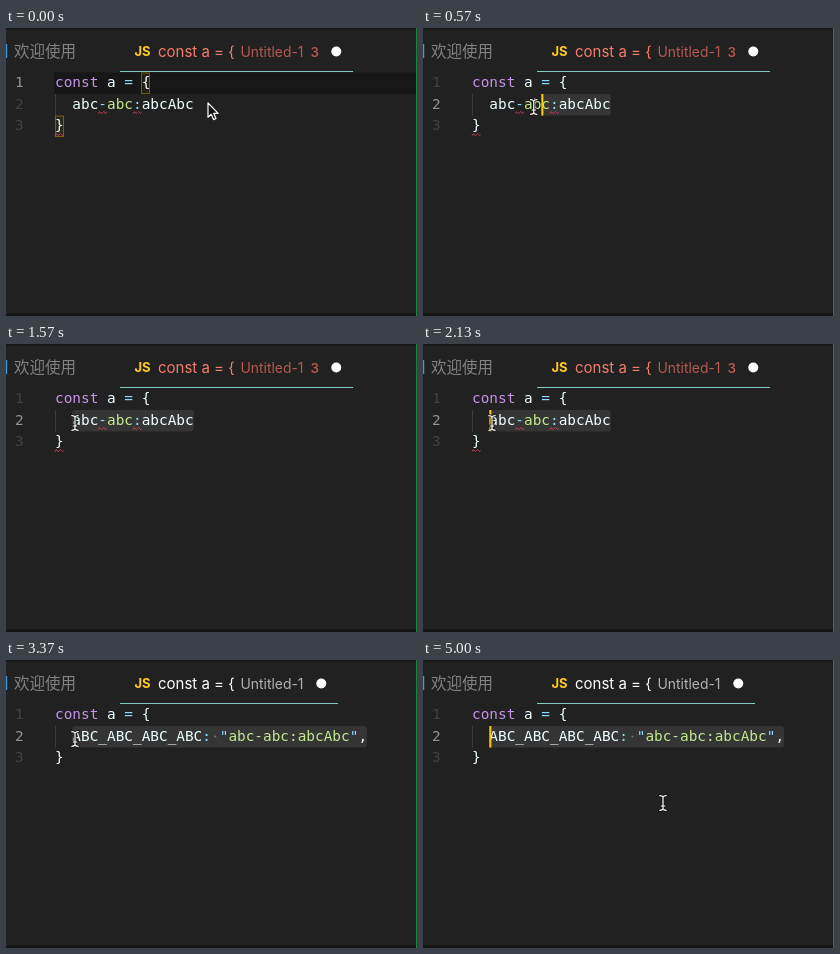
An HTML page for the animation above (5210 ms loop, 411 by 288 pixels).

```html
<!DOCTYPE html>
<html lang="zh">
<head>
<meta charset="utf-8">
<title>Editor: convert to constant</title>
<style>
html, body { margin: 0; width: 100%; height: 100%; overflow: hidden; background: #212121; }
svg { display: block; width: 411px; height: 288px; }
text { white-space: pre; }
.code { font: 14.4px "DejaVu Sans Mono", "Liberation Mono", monospace; font-variant-ligatures: none; }
.ui { font-family: Inter, "Liberation Sans", sans-serif; }
.cjk { font: 15.5px "Noto Sans CJK SC", "Noto Sans CJK", sans-serif; }
</style>
</head>
<body>
<svg viewBox="0 0 411 288" xmlns="http://www.w3.org/2000/svg">
  <rect width="411" height="288" fill="#212121"/>
  <rect width="411" height="1.5" fill="#171717"/>
  <rect y="285.5" width="411" height="2.5" fill="#151515"/>
  <rect x="410" width="1" height="288" fill="#16833f"/>
  <rect y="16" width="1.2" height="14" fill="#3b9be0"/>
  <text class="cjk" x="8" y="29" fill="#828282">欢迎使用</text>
  <text class="ui" x="128.5" y="28.3" font-size="13" font-weight="700" fill="#ffca28">JS</text>
  <text class="ui" id="title" x="152" y="28.7" font-size="15">const a = {</text>
  <text class="ui" id="file" x="234.5" y="28.7" font-size="13.9">Untitled-1</text>
  <text class="ui" id="badge" x="304.5" y="28.5" font-size="13.5" font-weight="500" fill="#c4594f">3</text>
  <circle id="dot" cy="23.5" r="5" fill="#fff"/>
  <rect id="line" x="114" y="43" height="1" fill="#80cbc4"/>

  <rect id="row" x="48" width="362" height="21.6" fill="#171717"/>
  <rect id="sel" y="66" height="21.5" rx="3" fill="#353535"/>
  <rect x="49" y="66" width="1" height="21.6" fill="#3c3c3c"/>
  <g id="match" fill="#ffcc00" fill-opacity=".05" stroke="#ffcc00" stroke-opacity=".36">
    <rect x="135.5" y="45" width="8" height="20.5"/>
    <rect x="49.5" y="88" width="8" height="20.5"/>
  </g>
  <g id="text" class="code"></g>
  <g id="waves" fill="none" stroke="#c9475b" stroke-width="1"></g>
  <rect id="caret" y="66" width="2" height="21.6" fill="#ffcc00"/>
  <g id="beam" fill="none" stroke-linecap="round"></g>
  <path id="arrow" d="M0 0V14.2L3.2 11.2L5.6 16.6L8 15.5L5.7 10.3H10.2Z" fill="#111" stroke="#fff" stroke-width="1.2" stroke-linejoin="round"/>
</svg>
<script>
const NS = 'http://www.w3.org/2000/svg';
const LOOP = 5210, LEFT = 49, CHAR = 8.669, INDENT = LEFT + 2 * CHAR;
const WHITE = '#eeffff', CYAN = '#89ddff', GREEN = '#c3e88d', PURPLE = '#c792ea';
const CLICK = 280, DRAG = 340, DROP = 1130, EDIT = 2670, VALID = 3040, TAB = 3100;
const $ = id => document.getElementById(id);

function add(parent, tag, attrs, content) {
  const el = document.createElementNS(NS, tag);
  set(el, attrs);
  if (content) el.textContent = content;
  parent.appendChild(el);
  return el;
}
function set(el, attrs) {
  for (const k in attrs) el.setAttribute(k, attrs[k]);
}
const show = (el, on) => el.setAttribute('visibility', on ? 'visible' : 'hidden');

// tokens: [text, colour] pairs set on the character grid
function codeLine(x, y, tokens) {
  const g = add($('text'), 'g', {});
  g.runs = tokens.map(([str, fill]) => {
    const run = add(g, 'text', { x, y, fill }, str);
    x += str.length * CHAR;
    return run;
  });
  return g;
}

const numbers = [59, 81, 102].map((y, i) => add($('text'), 'text', { x: 9, y }, String(i + 1)));
codeLine(LEFT, 59, [['const', PURPLE], [' a ', WHITE], ['=', CYAN], [' {', WHITE]]);
codeLine(LEFT, 102, [['}', WHITE]]);
const before = codeLine(INDENT, 81, [
  ['abc', WHITE], ['-', CYAN], ['abc', GREEN], [':', CYAN], ['abcAbc', WHITE]]);
const after = codeLine(INDENT, 81, [
  ['ABC_ABC_ABC_ABC', GREEN], [':', CYAN], [' ', WHITE], ['"', CYAN],
  ['abc-abc:abcAbc', GREEN], ['"', CYAN], [',', WHITE]]);
add(after, 'circle', { cx: INDENT + 16.5 * CHAR, cy: 76.5, r: 1, fill: '#707878' });

for (const [x, y] of [[INDENT + 3 * CHAR, 84.5], [INDENT + 7 * CHAR, 84.5], [LEFT, 106.5]])
  add($('waves'), 'path', { d: `M${x} ${y + 1}q1.1 -3 2.2 -1t2.2 0t2.2 0t2 0` });

const beamPath = 'M-3.2 -7.3Q-.6 -7.3 0 -5.8Q.6 -7.3 3.2 -7.3M0 -5.8V5.8M-3.2 7.3Q-.6 7.3 0 5.8Q.6 7.3 3.2 7.3M-1.8 3H1.8';
add($('beam'), 'path', { d: beamPath, stroke: '#111', 'stroke-width': 2.8 });
add($('beam'), 'path', { d: beamPath, stroke: '#fff', 'stroke-width': 1.2 });

// pointer stops: time, x, y
const path = [
  [0, 202, 75], [60, 202, 75], [280, 187, 78], [340, 187, 78], [530, 118, 79],
  [570, 111, 79], [760, 64, 80], [1000, 70, 80], [1130, 69, 79], [3630, 69, 79],
  [3720, 105, 32], [3820, 160, 160], [3890, 190, 247], [3970, 205, 213],
  [4050, 222, 208], [4130, 233, 213], [4300, 240, 143], [LOOP, 240, 143]];

function pointer(t) {
  const i = Math.max(1, path.findIndex(p => p[0] >= t));
  const [t0, x0, y0] = path[i - 1], [t1, x1, y1] = path[i];
  const k = Math.max(0, (t - t0) / (t1 - t0));
  return [x0 + (x1 - x0) * k, y0 + (y1 - y0) * k];
}

const blinks = [[CLICK, 1570], [2000, 2570], [EDIT, 3170], [3670, 4200], [4700, LOOP]];

function draw(t) {
  const [x, y] = pointer(t);
  const isArrow = t < 60 || y < 44;
  show($('arrow'), isArrow);
  show($('beam'), !isArrow);
  set($(isArrow ? 'arrow' : 'beam'), { transform: `translate(${x} ${y})` });

  const clicked = t >= CLICK, edited = t >= EDIT, valid = t >= VALID, clean = t >= TAB;
  const active = clicked ? 1 : 0;
  numbers.forEach((n, i) => n.setAttribute('fill', i === active ? '#949494' : '#424242'));
  show($('row'), t < DRAG);
  $('row').setAttribute('y', clicked ? 66 : 44.5);
  show($('match'), !clicked);

  // the selection trails the pointer slightly
  let col = 14;
  if (t >= DROP) col = 0;
  else if (t >= DRAG) {
    const c = Math.round((pointer(t - 40)[0] - INDENT) / CHAR);
    col = Math.min(14, Math.max(0, c));
  }
  const caretX = INDENT + col * CHAR;
  const end = edited ? 34 : 14;
  show($('sel'), clicked && col < end);
  set($('sel'), { x: caretX, width: (end - col) * CHAR });
  $('caret').setAttribute('x', caretX);
  show($('caret'), blinks.some(([a, b]) => t >= a && t < b));

  show(before, !edited);
  show(after, edited);
  after.runs[0].setAttribute('fill', valid ? WHITE : GREEN);
  show($('waves'), !valid);

  $('title').setAttribute('fill', clean ? '#ffffff' : '#f47d6c');
  $('file').setAttribute('fill', clean ? '#b3b3b3' : '#b65950');
  show($('badge'), !clean);
  $('dot').setAttribute('cx', clean ? 315.3 : 330.3);
  $('line').setAttribute('width', clean ? 218 : 233);
}

const start = performance.now();
function tick() {
  draw((performance.now() - start) % LOOP);
  requestAnimationFrame(tick);
}
draw(0);
requestAnimationFrame(tick);
</script>
</body>
</html>
```
